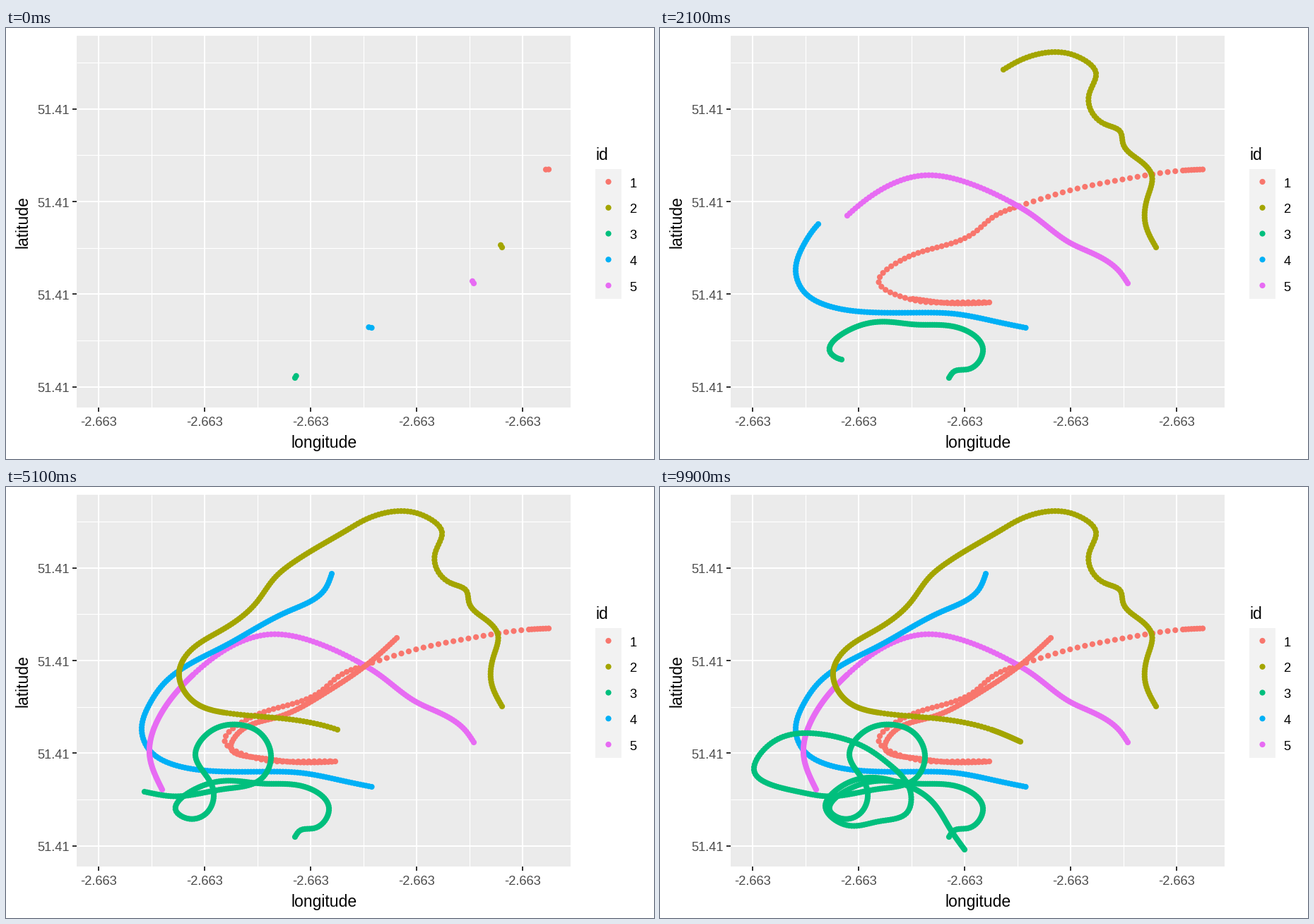
A matplotlib script that plays this animation: 917x611 px, repeating every 10000 ms.

```python
import numpy as np
import matplotlib.pyplot as plt
from matplotlib.animation import FuncAnimation
from matplotlib.colors import to_rgba
from matplotlib.patches import Rectangle

W, H, DPI = 917, 611, 64
PT = 72 / DPI          # points per pixel
FRAMES, INTERVAL = 100, 100
RATE = 5               # fixes per frame
START = -1 / RATE      # two fixes are already visible at first
DOT = 8.2
BIG, SMALL = 23, 18.4
L, R, T, B = 100, 799, 11, 538

# Per track: the frame in which each leg ends, and the leg's key points.
TRACKS = {
    "#F8766D": {
        START: [(768, 200.5)],
        1.2: [(740, 202)],
        5.6: [(664, 213), (581, 230), (508, 252.5)],
        11: [(470, 269), (445, 290), (400, 309), (340, 330)],
        16.6: [(309.5, 360), (345, 382), (420, 389), (466, 389)],
        21: [(420, 390.5), (358, 384)],
        36: [(318, 369), (325, 353), (385, 326), (450, 293), (513, 250), (553, 214)]},
    "#A3A500": {
        START: [(702, 311)],
        11: [(687, 278), (690, 240), (696, 209), (679, 188), (655, 163),
             (652, 148), (629, 136)],
        21: [(607, 95), (617, 64), (592, 41), (575, 35.5), (505, 48), (486, 59)],
        36: [(405, 108), (381, 128), (355, 163), (305, 203), (252, 243)],
        44.5: [(245, 262), (264, 303), (310, 320)],
        51: [(390, 328), (469, 344)],
        55: [(510, 361)]},
    "#00BF7D": {
        START: [(409, 496)],
        11: [(416, 487), (437, 483.5), (457, 455), (431, 428), (363, 420.5)],
        21: [(278, 423.5), (241, 460), (257, 470)],
        36: [(284, 462), (293, 428), (268, 380), (290, 346), (330, 337), (356, 346)],
        44.3: [(375, 382), (362, 413), (310, 428)],
        51: [(239, 438.5), (196, 432)],
        55.4: [(133, 401)],
        67: [(155, 365), (225, 350), (297, 373), (323, 392)],
        77: [(355, 435), (350, 461), (310, 474), (261, 478.5)],
        88: [(234, 452), (249, 430), (296, 412), (335, 418)],
        99: [(385, 446), (412, 487), (431, 514)]},
    "#00B0F6": {
        START: [(517.5, 425)],
        11: [(481, 417.5), (415, 405), (371, 403.5), (289, 402.5)],
        21: [(240, 394.5), (203, 373), (192, 345), (203, 308), (224, 278)],
        36: [(250, 257), (310, 225), (400, 176), (452, 144), (461, 123)]},
    "#E76BF3": {
        START: [(662, 362)],
        11: [(650, 345), (609, 318), (581, 305), (528, 266), (495, 246)],
        21: [(440, 221), (372, 209), (315, 228), (265, 266)],
        36: [(222, 317), (203, 378), (221, 429)]},
}


def spline(pts, steps=24):
    """Natural cubic spline through pts, parametrised by chord length."""
    n = len(pts)
    h = np.hypot(*np.diff(pts, axis=0).T)
    d = np.diff(pts, axis=0) / h[:, None]
    A, rhs = np.zeros((n, n)), np.zeros((n, 2))
    A[0, :2], rhs[0] = (2, 1), 3 * d[0]
    A[-1, -2:], rhs[-1] = (1, 2), 3 * d[-1]
    for i in range(1, n - 1):
        a, b = h[i - 1], h[i]
        A[i, i - 1:i + 2] = b, 2 * (a + b), a
        rhs[i] = 3 * (b * d[i - 1] + a * d[i])
    m = np.linalg.solve(A, rhs)
    s = np.linspace(0, 1, steps, endpoint=False)[:, None]
    ease = 3 * s**2 - 2 * s**3
    parts = [(1 - ease) * pts[i] + ease * pts[i + 1]
             + h[i] * ((s**3 - 2 * s**2 + s) * m[i] + (s**3 - s**2) * m[i + 1])
             for i in range(n - 1)]
    return np.vstack(parts + [pts[-1:]])


def fixes(legs, steps=24):
    """Sample a track RATE times per frame, at steady speed within each leg."""
    curve = spline(np.array(sum(legs.values(), []), float), steps)
    arc = np.r_[0, np.cumsum(np.hypot(*np.diff(curve, axis=0).T))]
    ends = np.cumsum([len(p) for p in legs.values()]) - 1
    when = list(legs)
    t = np.arange(-1, round(when[-1] * RATE) + 1) / RATE
    s = np.interp(t, when, arc[ends * steps])
    return t, np.c_[np.interp(s, arc, curve[:, 0]), np.interp(s, arc, curve[:, 1])]


times, spots, inks = [], [], []
for color, legs in TRACKS.items():
    t, xy = fixes(legs)
    times.append(t)
    spots.append(xy)
    inks.append(np.tile(to_rgba(color), (len(t), 1)))
times = np.concatenate(times)
order = np.argsort(times, kind="stable")   # later fixes lie on top
times = times[order]
spots = np.vstack(spots)[order]
inks = np.vstack(inks)[order]

plt.rcParams["font.family"] = "Liberation Sans"
fig = plt.figure(figsize=(W / DPI, H / DPI), dpi=DPI, facecolor="white")
ax = fig.add_axes([0, 0, 1, 1])
ax.set_xlim(0, W)
ax.set_ylim(H, 0)
ax.axis("off")


def box(x0, y0, x1, y1, color):
    ax.add_patch(Rectangle((x0, y0), x1 - x0, y1 - y0, fc=color, lw=0, zorder=0))


def line(x, y, color="white", width=2):
    ax.plot(x, y, color=color, lw=width * PT, solid_capstyle="butt", zorder=1)


def label(x, y, text, size, color="black", ha="center", rotation=0):
    ax.text(x, y, text, fontsize=size * PT, color=color, ha=ha, va="baseline",
            rotation=rotation, rotation_mode="anchor")


xs = 131 + 150 * np.arange(5)
ys = 114.7 + 131.3 * np.arange(4)

box(L, T, R, B, "#EBEBEB")
for x in xs[:-1] + 75:
    line([x, x], [T, B], width=1.1)
for y in ys - 65.65:
    line([L, R], [y, y], width=1.1)
for x in xs:
    line([x, x], [T, B])
    line([x, x], [B, B + 5.8], "#333333")
    label(x, 563.5, "-2.663", SMALL, "#4D4D4D")
for y in ys:
    line([L, R], [y, y])
    line([L - 5.8, L], [y, y], "#333333")
    label(90, y + 7.6, "51.41", SMALL, "#4D4D4D", "right")
label(450, 594.5, "longitude", BIG)
label(30.5, 274.5, "latitude", BIG, rotation=90)

box(834, 200, 871, 384, "#F2F2F2")
label(834.5, 187, "id", BIG, ha="left")
keys = 218 + 36.75 * np.arange(len(TRACKS))
for i, y in enumerate(keys):
    label(882.5, y + 7.6, str(i + 1), SMALL, ha="left")

area = (DOT * PT) ** 2
ax.scatter(np.full(len(keys), 852.5), keys, s=area, c=list(TRACKS), linewidths=0, zorder=3)
dots = ax.scatter(*spots.T, s=area, c=inks, linewidths=0, zorder=3)


def draw(frame):
    n = np.searchsorted(times, frame + 1e-6, side="right")
    dots.set_offsets(spots[:n])
    dots.set_facecolor(inks[:n])
    return dots,


anim = FuncAnimation(fig, draw, frames=FRAMES, interval=INTERVAL, repeat=True)
plt.show()
```
